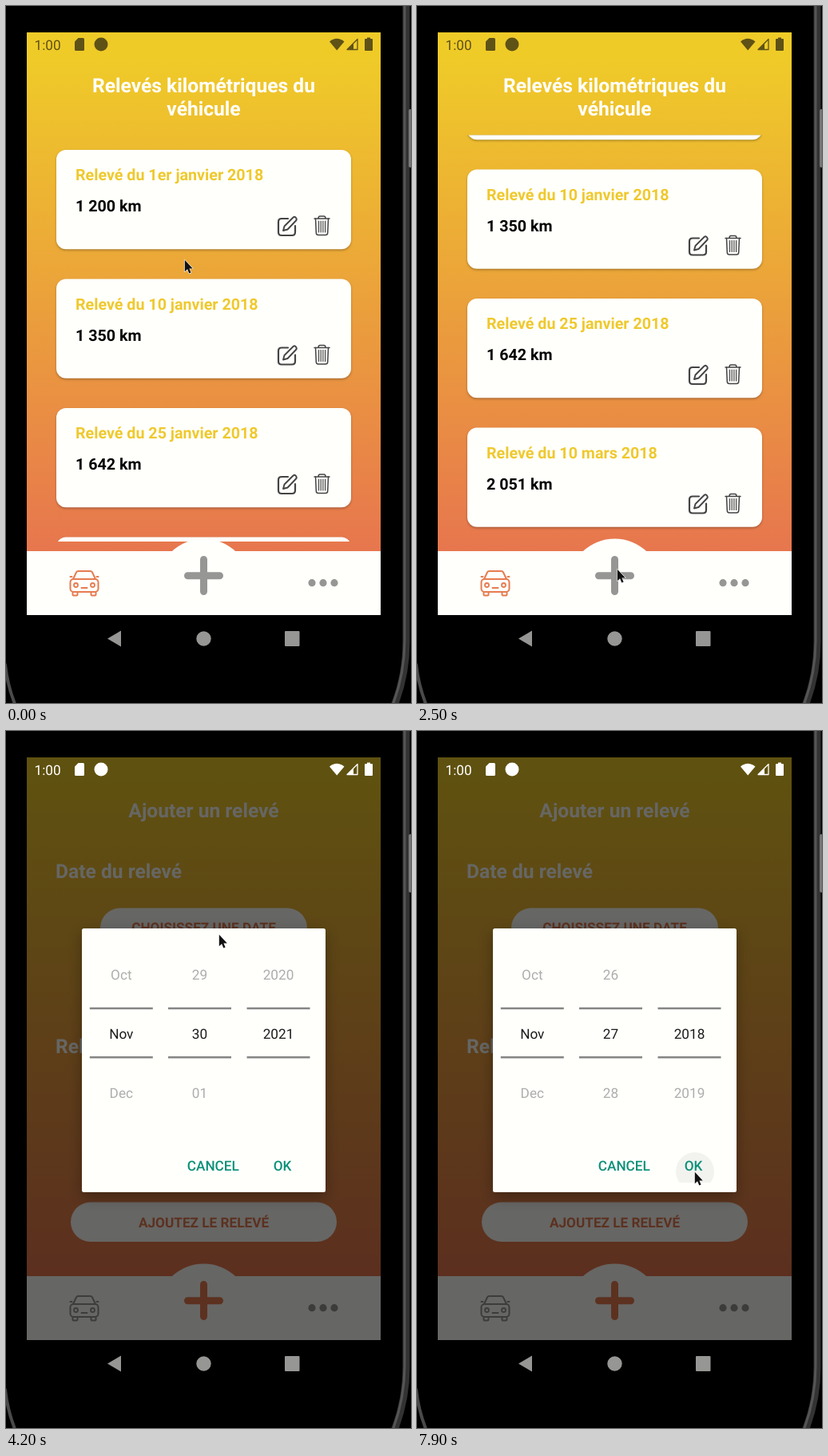
These frames come from a looping animation (507 by 872 pixels, 8 s). An HTML page with a canvas:

```html
<!DOCTYPE html>
<html lang="fr">
<head>
<meta charset="utf-8">
<style>
html, body { margin: 0; width: 100%; height: 100%; overflow: hidden; background: #000; }
canvas { display: block; }
</style>
</head>
<body>
<canvas id="stage" width="507" height="872"></canvas>
<script>
const c = document.getElementById('stage').getContext('2d');
const LOOP = 8000, STEP = 100, CX = 247.5;
const WHITE = '#fffffc', ORANGE = '#e67c51', YELLOW = '#efc92e', GREY = '#969694', DARK = '#444';
const TITLE = 24.6, BODY = 19.7, SMALL = 17.2;
const LIST_TOP = 161.5, LIST_H = 508.5, PITCH = 161.5, MAX_SCROLL = 137, ROW = 74;
const CARDS = [
  ['1er janvier 2018', '1 200 km'], ['10 janvier 2018', '1 350 km'],
  ['25 janvier 2018', '1 642 km'], ['10 mars 2018', '2 051 km']
];
// Pointer moves: start, end, x, y
const MOVES = [
  [300, 400, 246, 396], [500, 800, 246, 520], [900, 1800, 231, 221], [1800, 2500, 250, 704],
  [3200, 3700, 266, 254], [4200, 4800, 372, 310], [4900, 5500, 396, 586],
  [5800, 6200, 268, 339], [6400, 7000, 380, 575], [7100, 7600, 347, 551]
];

// Progress from 0 to 1 between two times
const ramp = (t, from, to) => Math.min(1, Math.max(0, (t - from) / (to - from)));

function pointerAt(t) {
  let x = 223, y = 317;
  for (const [from, to, toX, toY] of MOVES) {
    const p = ramp(t, from, to);
    x += (toX - x) * p;
    y += (toY - y) * p;
  }
  return { x, y };
}

// Vertical distance dragged so far between two times
const drag = (t, from, to) =>
  pointerAt(Math.min(to, Math.max(from, t))).y - pointerAt(from).y;

function text(s, x, y, size, color, weight = 400, align = 'left') {
  c.font = `${weight} ${size}px Roboto, sans-serif`;
  c.textRendering = 'geometricPrecision';
  c.textAlign = align;
  c.fillStyle = color;
  c.fillText(s, x, y);
}
const centred = (s, y, size, color, weight, x = CX) => text(s, x, y, size, color, weight, 'center');

function box(x, y, w, h, color, r = 0) {
  c.fillStyle = color;
  c.beginPath();
  c.roundRect(x, y, w, h, r);
  c.fill();
}
function disc(x, y, r, color) {
  c.fillStyle = color;
  c.beginPath();
  c.arc(x, y, r, 0, 7);
  c.fill();
}
function shape(d, color) {
  c.fillStyle = color;
  c.fill(new Path2D(d));
}
function line(d, color, width) {
  c.strokeStyle = color;
  c.lineWidth = width;
  c.lineCap = c.lineJoin = 'round';
  c.stroke(new Path2D(d));
}
function outline(x, y, w, h, r, color, width) {
  c.strokeStyle = color;
  c.lineWidth = width;
  c.beginPath();
  c.roundRect(x, y, w, h, r);
  c.stroke();
}
function scoped(draw) {
  c.save();
  draw();
  c.restore();
}
function clip(x, y, w, h) {
  c.beginPath();
  c.rect(x, y, w, h);
  c.clip();
}
function raised(alpha, blur, dy, draw) {
  scoped(() => {
    c.shadowColor = `rgba(0,0,0,${alpha})`;
    c.shadowBlur = blur;
    c.shadowOffsetY = dy;
    draw();
  });
}

function phone() {
  box(0, 0, 507, 872, '#000');
  line('M501 0V795Q501 840 484 880', '#333', 9);
  line('M499 0V795Q499 838 482 880', '#555', 3);
  line('M-1 824Q2 852 13 878', '#4a4a4a', 4);
  box(504, 129, 4, 73, '#77777a', 2);
}

function background() {
  const g = c.createLinearGradient(0, 62, 0, 682);
  g.addColorStop(0, '#efcb28');
  g.addColorStop(1, '#e7764e');
  box(26, 62, 443, 620, g);
}

function editIcon() {
  line('M353 86H345Q341 86 341 90V103Q341 107 345 107H358Q362 107 362 103V95', DARK, 2.2);
  line('M347 101L348.5 95.5L359.5 84.5Q361.5 83 363 85T363 88.5L352.5 99.5Z', DARK, 1.9);
}

function trashIcon() {
  line('M386 86H405M391 86Q391 83 393 83H398Q400 83 400 86', DARK, 1.5);
  line('M387.5 86L388.3 104Q388.5 106.5 391 106.5H400Q402.5 106.5 402.7 104L403.5 86', DARK, 1.5);
  for (let i = 0; i < 4; i++) line(`M${391.5 + i * 2.7} 89V103`, DARK, 1.2);
}

function card([date, km], y) {
  scoped(() => {
    c.translate(0, y);
    raised(0.28, 3, 1.5, () => box(63, 0, 369, 124.3, WHITE, 12));
    text('Relevé du ' + date, 87, 38.3, BODY, YELLOW, 700);
    text(km, 87, 77.2, BODY, '#000', 700);
    editIcon();
    trashIcon();
  });
}

function listPage(t) {
  const scroll = Math.min(MAX_SCROLL, -1.17 * drag(t, 900, 1800));
  const bar = ramp(t, 900, 1000) - ramp(t, 2000, 2300);
  const glow = ramp(t, 1200, 1600) - ramp(t, 1800, 2100);
  background();
  centred('Relevés kilométriques du', 107.7, TITLE, WHITE, 700);
  centred('véhicule', 136.5, TITLE, WHITE, 700);
  scoped(() => {
    clip(26, LIST_TOP, 443, LIST_H);
    CARDS.forEach((d, i) => card(d, 180 + i * PITCH - scroll));
    const ratio = LIST_H / (LIST_H + MAX_SCROLL);
    box(427, LIST_TOP + scroll * ratio, 5, LIST_H * ratio, `rgba(0,0,0,${0.29 * bar})`);
    clip(63, LIST_TOP, 369, LIST_H);
    c.fillStyle = `rgba(255,255,250,${0.24 * glow})`;
    c.beginPath();
    c.ellipse(CX, 684, 320, 32 * glow, 0, 0, 7);
    c.fill();
  });
}

function pill(y, w, h) {
  box(CX - w / 2, y, w, h, WHITE, h / 2);
}

function formPage() {
  background();
  centred('Ajouter un relevé', 107.7, TITLE, WHITE, 700);
  text('Date du relevé', 62, 183.7, TITLE, WHITE, 700);
  pill(221.5, 259, 49.5);
  centred('CHOISISSEZ UNE DATE', 252.4, SMALL, ORANGE, 700);
  centred('La date sélectionnée est le 30', 310.3, BODY, WHITE);
  centred('novembre 2021', 333.4, BODY, WHITE);
  text('Relevé kilométrique', 62, 403, TITLE, WHITE, 700);
  pill(441, 259, 51);
  text('0', 143, 474, BODY, GREY, 700);
  centred('Entrez le relevé ci-dessus', 531, BODY, WHITE);
  pill(589.5, 333, 49.5);
  centred('AJOUTEZ LE RELEVÉ', 620.7, SMALL, ORANGE, 700);
}

function carIcon(color) {
  line('M84 717L88 708.5Q88.7 707 90.5 707H105.5Q107.3 707 108 708.5L112 717', color, 2);
  outline(80.5, 717, 35, 16, 4, color, 2);
  line('M80.5 714H82.5M113.5 714H115.5M94.5 728H101.5', color, 2);
  for (const side of [-1, 1]) {
    const x = 98 + side * 10.5;
    outline(x - 2.5, 722, 5, 5, 2.5, color, 1.8);
    outline(x + side - 3, 733, 6, 4.5, 1, color, 2);
  }
}

function tabBar(onForm) {
  scoped(() => {
    clip(26, 660, 443, 102);
    disc(CX, 725, 58.5, WHITE);
    box(26, 682, 443, 80, WHITE);
  });
  carIcon(onForm ? GREY : ORANGE);
  line('M227.5 712.7H267.5M247.5 692.5V732.5', onForm ? ORANGE : GREY, 9);
  for (let i = -1; i < 2; i++) disc(397 + i * 14, 721.7, 4.6, GREY);
}

function statusIcons(color) {
  text('1:00', 35.5, 54.5, SMALL, color);
  shape('M90.5 40H96.5Q98 40 98 41.5V54.5Q98 56 96.5 56H87.5Q86 56 86 54.5V44.5Z', color);
  disc(119, 48, 8.5, color);
  shape('M405 44.5Q414 37 423.5 44.5L414.2 55.5Z', color);
  line('M440 41.5V54.5H427Z', color, 1.3);
  shape('M435 46.5V55H427Z', color);
  box(449, 41, 10, 15, color, 1);
  box(452, 39.5, 4, 3, color);
}

function systemBar() {
  shape('M127 791.5L144 781.5V801.5Z', GREY);
  disc(CX, 791.5, 9.2, GREY);
  box(349, 782, 18.5, 19, GREY, 1);
}

// The wheel's text fades towards its top and bottom edges
function wheel(x, from, to, current, label) {
  for (let v = from; v <= to; v++) {
    const d = (v - current) * ROW;
    const alpha = Math.min(1, (110.7 - Math.abs(d)) / 102);
    if (alpha > 0) centred(label(v), 384.7 + d, SMALL, `rgba(28,28,28,${alpha})`, 400, x);
  }
  for (const y of [345.8, 407]) box(x - 39.5, y, 79, 2.4, '#858583');
}

function dialog(t) {
  const alpha = ramp(t, 3900, 4200), ripple = ramp(t, 7600, 7900);
  box(26, 33, 443, 729, `rgba(0,0,0,${0.6 * alpha})`);
  c.globalAlpha = alpha;
  raised(0.3, 18, 6, () => box(95, 247, 305, 330, WHITE, 2.5));
  scoped(() => {
    clip(320, 520, 60, 45);
    disc(348, 551, 24 * ripple, `rgba(0,0,0,${0.05 * ripple})`);
  });
  const day = 30 - Math.min(3, drag(t, 6400, 7000) / ROW);
  const year = 2021 - Math.min(3, drag(t, 4900, 5500) / ROW);
  scoped(() => {
    clip(95, 268, 305, 221);
    wheel(144.3, 10, 12, 11, v => ['Oct', 'Nov', 'Dec'][v - 10]);
    wheel(242.5, 24, 32, day, v => v > 30 ? '0' + (v - 30) : '' + v);
    wheel(341, 2018, 2021, year, String);
  });
  centred('CANCEL', 549.8, SMALL, '#0b9079', 500, 259.3);
  centred('OK', 549.8, SMALL, '#0b9079', 500, 346);
  c.globalAlpha = 1;
}

function pointer({ x, y }) {
  scoped(() => {
    c.translate(x + 0.8, y + 0.8);
    const arrow = 'M0 0V14.5L3.3 11.4L5.5 16.8L7.8 15.8L5.6 10.6H10Z';
    line(arrow, '#fff', 1.2);
    shape(arrow, '#111');
  });
}

function render(t) {
  const onForm = t >= 2800, picking = t >= 4000;
  phone();
  box(26, 33, 443, 30, '#efcb28');
  if (t < 2900) listPage(t);
  if (onForm) {
    const scale = 1 - 0.04 * (1 - ramp(t, 2800, 3130)) ** 3;
    scoped(() => {
      c.globalAlpha = ramp(t, 2700, 2900);
      box(26, 62, 443, 620, '#f1ead8');
      c.translate(CX, 372);
      c.scale(scale, scale);
      c.translate(-CX, -372);
      formPage();
    });
  }
  tabBar(onForm);
  if (picking) dialog(t);
  statusIcons(picking ? '#fff' : '#5f5216');
  systemBar();
  pointer(pointerAt(t));
}

function tick(now) {
  render(Math.floor(now % LOOP / STEP) * STEP);
  requestAnimationFrame(tick);
}
requestAnimationFrame(tick);
</script>
</body>
</html>
```
